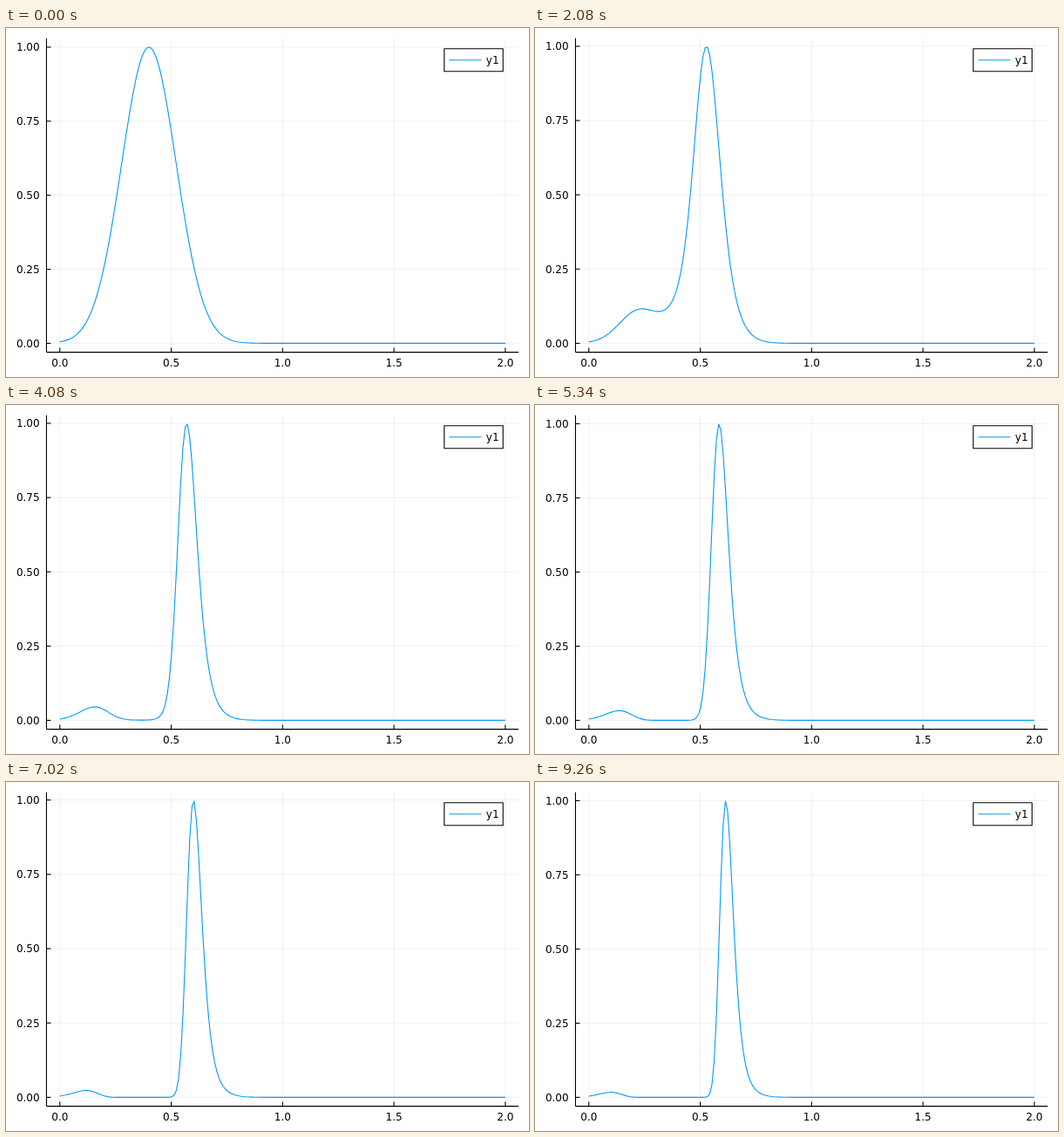
Recreate the animation shown at these times as an HTML page with a canvas. Size 600x400 px, loop 9280 ms.

```html
<!DOCTYPE html>
<html lang="en">
<head>
<meta charset="utf-8">
<title>Steepening pulse</title>
<style>
  html, body { margin: 0; width: 100%; height: 100%; overflow: hidden; background: #fff; }
  canvas { display: block; width: 600px; height: 400px; }
</style>
</head>
<body>
<canvas id="plot" width="600" height="400"></canvas>
<script>
const ctx = document.getElementById('plot').getContext('2d');
const area = { left: 46.45, right: 588.19, top: 11.81, bottom: 371.6 };
const POINTS = 200, STEPS = 200, LOOP = 9280;
const BLUE = '#009afa';
const xTicks = [0, 0.5, 1, 1.5, 2];
const yTicks = [0, 0.25, 0.5, 0.75, 1];

// Each axis is padded by 3% of its data range at both ends.
const along = (from, to, part) => from + (to - from) * (0.03 + part) / 1.06;
const px = x => along(area.left, area.right, x / 2);

const pulse = x => Math.exp(-((x - 0.4) ** 2) / 0.03);
const wave = (x, t) => pulse(x - pulse(x) * t);

function stroke(points, color, width) {
  ctx.beginPath();
  points.forEach(([x, y]) => ctx.lineTo(x, y));
  ctx.strokeStyle = color;
  ctx.lineWidth = width;
  ctx.stroke();
}

function label(text, x, y, align) {
  ctx.textAlign = align;
  ctx.fillStyle = '#000';
  ctx.fillText(text, x, y);
}

function draw(step) {
  const t = step / (STEPS - 1);
  const data = Array.from({ length: POINTS }, (_, i) => {
    const x = 2 * i / (POINTS - 1);
    return [x, wave(x, t)];
  });
  const peak = Math.max(...data.map(d => d[1]));
  const py = y => along(area.bottom, area.top, y / peak);
  const { left, right, top, bottom } = area;

  ctx.fillStyle = '#fff';
  ctx.fillRect(0, 0, 600, 400);
  ctx.font = '12px "DejaVu Sans", sans-serif';
  ctx.lineJoin = 'round';

  const grid = 'rgba(0,0,0,0.1)';
  xTicks.forEach(x => stroke([[px(x), top], [px(x), bottom]], grid, 0.65));
  yTicks.forEach(y => stroke([[left, py(y)], [right, py(y)]], grid, 0.65));

  stroke([[left, bottom], [right, bottom]], '#000', 1.1);
  stroke([[left, top], [left, bottom]], '#000', 1.1);
  for (const x of xTicks) {
    stroke([[px(x), bottom], [px(x), bottom - 5]], '#000', 1.1);
    label(x.toFixed(1), px(x), 387.8, 'center');
  }
  for (const y of yTicks) {
    stroke([[left, py(y)], [left + 5, py(y)]], '#000', 1.1);
    label(y.toFixed(2), 38.6, py(y) + 4.4, 'right');
  }

  stroke(data.map(([x, y]) => [px(x), py(y)]), BLUE, 1.1);

  ctx.fillStyle = '#fff';
  ctx.fillRect(502.8, 23.8, 67.4, 25.9);
  ctx.strokeStyle = '#000';
  ctx.lineWidth = 1.1;
  ctx.strokeRect(502.8, 23.8, 67.4, 25.9);
  stroke([[508.4, 36.8], [545.5, 36.8]], BLUE, 1.1);
  label('y1', 550.8, 41.2, 'left');
}

// Steps come in threes, held for 20, 100 and 20 ms.
function stepAt(ms) {
  const rest = ms % 140;
  return 3 * Math.floor(ms / 140) + (rest < 20 ? 0 : rest < 120 ? 1 : 2);
}

const start = performance.now();
let shown = -1;
function tick() {
  const step = stepAt((performance.now() - start) % LOOP);
  if (step !== shown) draw(shown = step);
  requestAnimationFrame(tick);
}
tick();
</script>
</body>
</html>
```
